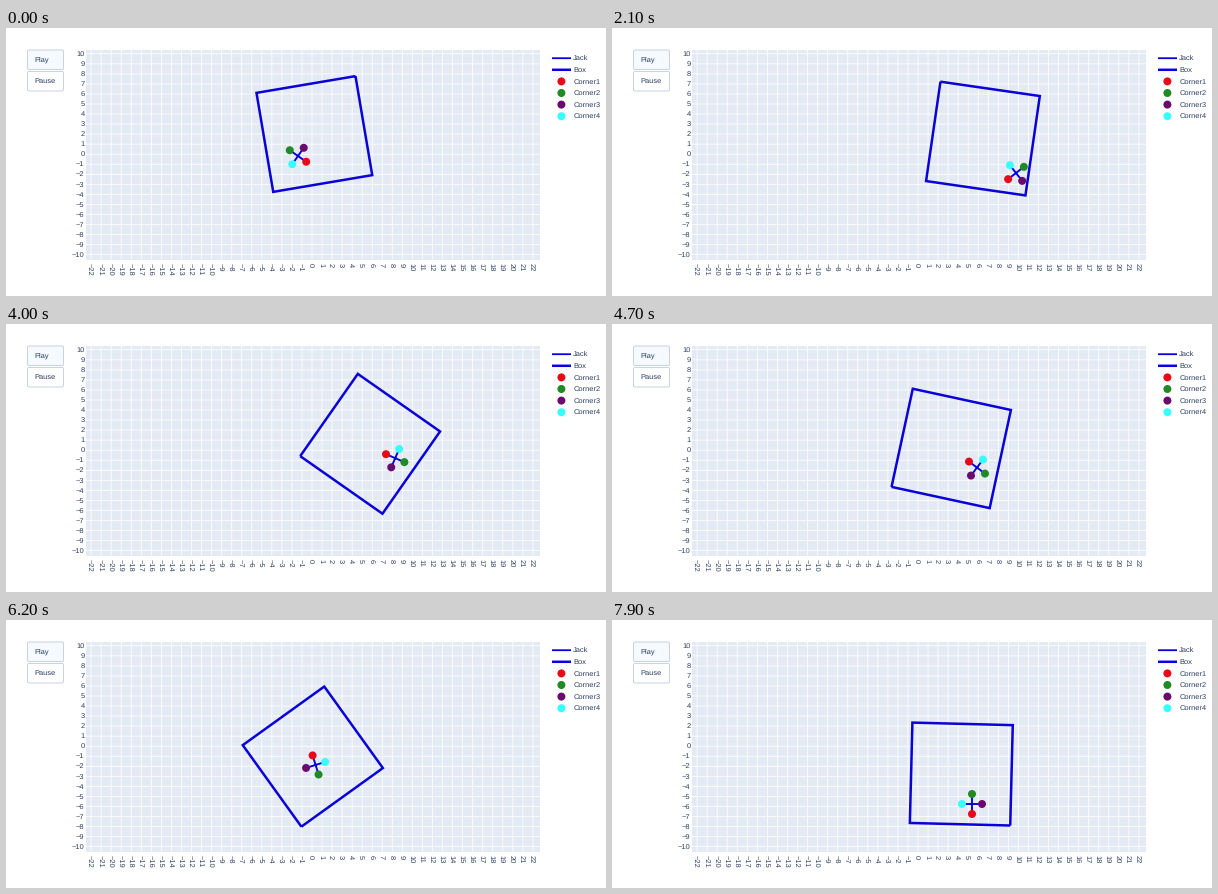
Recreate the animation shown at these times as a matplotlib script. Size 600x268 px, loop 8 s.

```python
import numpy as np
import matplotlib.pyplot as plt
from matplotlib.animation import FuncAnimation
from matplotlib.patches import Circle, FancyBboxPatch, Rectangle

plt.rcParams["text.hinting"] = "none"

W, H, DPI = 600, 268, 100
PT = 72 / DPI
FRAMES, STEP = 80, 100
UNIT, X0, Y0 = 10.04, 306, 126.2
HALF, ARM, GRAVITY = 50.2, 10, 98

INK, LINE = "#2a3f5f", "#0a00d8"
DOTS = ["#e60a18", "#1f8b22", "#6b0a6e", "#38ffff"]

# Jack at each bounce: time, x, y, angle
BOUNCES = np.array([
    (0.00, 292, 128, 35),
    (1.00, 326, 156, -76),
    (2.10, 404, 145, -218),
    (2.33, 403, 154, -202),
    (3.30, 413, 103, -135),
    (4.27, 380, 159, -165),
    (5.53, 336, 165, -101),
    (6.90, 282, 171, -114),
    (7.90, 360, 184, -270),
])


def box_pose(t):
    """Swaying sideways, sinking, and turning ever more slowly."""
    x = 344.8 + 38 * np.sin(0.973 * (t - 1.32))
    y = 106 + 0.75 * t + 0.675 * t ** 2
    return x, y, 80.4 - 34.95 * t + 0.275 * t ** 2


def jack_pose(t):
    """Free fall with a steady spin from one bounce to the next."""
    i = min(np.searchsorted(BOUNCES[:, 0], t, "right"), len(BOUNCES) - 1)
    a, b = BOUNCES[i - 1], BOUNCES[i]
    _, x, y, angle = a + (b - a) * (t - a[0]) / (b[0] - a[0])
    return x, y - GRAVITY / 2 * (t - a[0]) * (b[0] - t), angle


def around(x, y, radius, degrees):
    a = np.radians(degrees)
    return x + radius * np.cos(a), y + radius * np.sin(a)


fig = plt.figure(figsize=(W / DPI, H / DPI), dpi=DPI, facecolor="white")
ax = fig.add_axes([0, 0, 1, 1])
ax.set(xlim=(0, W), ylim=(H, 0))
ax.axis("off")


def label(x, y, s, va="baseline", **kw):
    ax.text(x, y, s, va=va, family="Liberation Sans", size=7.5 * PT, color=INK, **kw)


def stroke(xs, ys, color, width, z):
    return ax.plot(xs, ys, color=color, lw=width * PT, zorder=z, snap=False,
                   solid_capstyle="butt", solid_joinstyle="miter")[0]


def dot(x, y, color):
    return ax.add_patch(Circle((x, y), 4, fc=color, lw=0, zorder=6))


def signed(n):
    return str(n).replace("-", "\u2212")


# Plot area, grid and tick labels
LEFT, RIGHT, TOP, BOTTOM = 80, 534, 21.5, 231.5
ax.add_patch(Rectangle((LEFT, TOP), RIGHT - LEFT, BOTTOM - TOP, fc="#e4eaf4", lw=0))
for n in range(-22, 23):
    x = X0 + n * UNIT
    stroke([x, x], [TOP, BOTTOM], "white", 0.8, 2)
    label(x - 1.2, 234.8, signed(n), va="top", ha="center", rotation=-90)
for n in range(-10, 11):
    y = Y0 - n * UNIT
    stroke([LEFT, RIGHT], [y, y], "white", 0.8, 2)
    label(78.6, y + 2.2, signed(n), ha="right")

# Buttons
for y, s, fill in [(22, "Play", "#f4faff"), (43.5, "Pause", "white")]:
    ax.add_patch(FancyBboxPatch((21.5, y), 36, 19.5, fc=fill, ec="#c3cfdf", lw=0.9 * PT,
                                boxstyle="round,pad=0,rounding_size=1.5", snap=False))
    label(28.6, y + 11.6, s)

# Legend
for k, s in enumerate(["Jack", "Box"] + [f"Corner{n}" for n in range(1, 5)]):
    y = 30.2 + 11.6 * k
    label(567.2, y + 2.2, s)
    if k < 2:
        stroke([546, 565], [y, y], LINE, (1.8, 2.5)[k], 4)
    else:
        dot(555.4, y, DOTS[k - 2])

jack = stroke([], [], LINE, 1.9, 4)
box = stroke([], [], LINE, 2.5, 5)
tips = [dot(0, 0, c) for c in DOTS]


def update(frame):
    t = frame * STEP / 1000
    x, y, angle = box_pose(t)
    box.set_data(*around(x, y, HALF * np.sqrt(2), angle - 135 + 90 * np.arange(5)))

    x, y, angle = jack_pose(t)
    px, py = around(x, y, ARM, angle + np.array([0, 180, -90, 90]))
    jack.set_data(np.insert(px, 2, np.nan), np.insert(py, 2, np.nan))
    for tip, center in zip(tips, zip(px, py)):
        tip.center = center
    return [jack, box, *tips]


anim = FuncAnimation(fig, update, frames=FRAMES, interval=STEP, repeat=True, repeat_delay=0)
plt.show()
```
